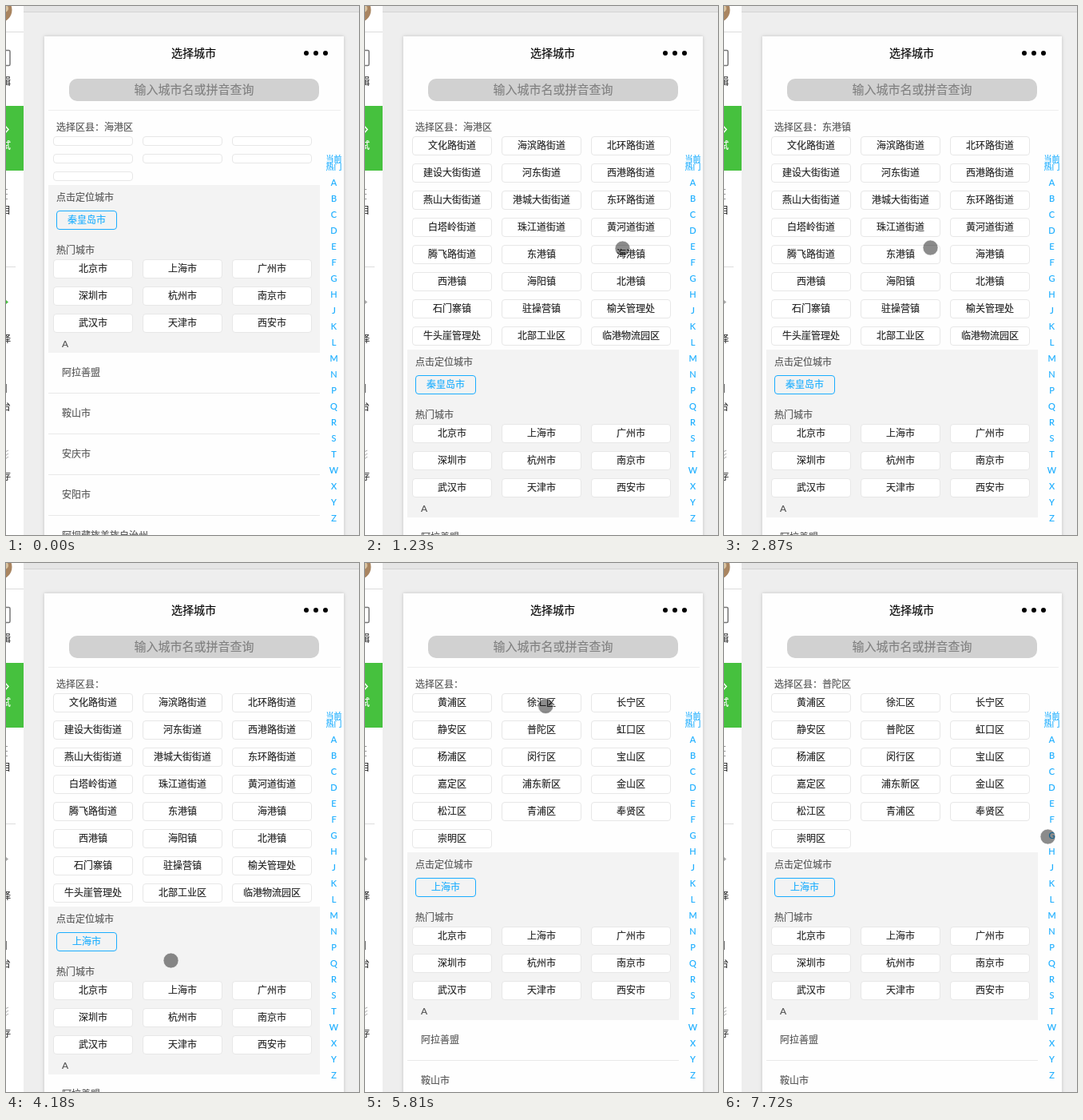
Write an HTML page that moves like this. It is 442 by 662 pixels and loops after 8000 ms.

```html
<!DOCTYPE html>
<html lang="zh-CN">
<head>
<meta charset="utf-8">
<title>选择城市</title>
<style>
  html, body { margin: 0; width: 100%; height: 100%; overflow: hidden; background: #eee; }
  svg { display: block; width: 442px; height: 662px; }
  text { font-family: "Noto Sans CJK SC", "Noto Sans CJK", sans-serif; }
  .latin { font-family: Lato, "Noto Sans", sans-serif; }
  .mid { text-anchor: middle; }
  .phone { filter: drop-shadow(0 0 2px rgba(0, 0, 0, .18)); }
</style>
</head>
<body>
<svg viewBox="0 0 442 662">
  <g id="back"></g>
  <g id="page"></g>
  <g id="side"></g>
  <circle id="cursor" r="9.5" fill="#000" fill-opacity=".45" stroke="#fff" stroke-opacity=".6"/>
</svg>
<script>
const LOOP = 8000, START = 30, TICK = 147.8;
const BLUE = '#1aadff', GREEN = '#46c13e', GREY = '#555';
const $ = id => document.getElementById(id);

const towns = ('文化路街道 海滨路街道 北环路街道 建设大街街道 河东街道 西港路街道 ' +
  '燕山大街街道 港城大街街道 东环路街道 白塔岭街道 珠江道街道 黄河道街道 ' +
  '腾飞路街道 东港镇 海港镇 西港镇 海阳镇 北港镇 石门寨镇 驻操营镇 榆关管理处 ' +
  '牛头崖管理处 北部工业区 临港物流园区').split(' ');
const districts = ('黄浦区 徐汇区 长宁区 静安区 普陀区 虹口区 杨浦区 闵行区 宝山区 ' +
  '嘉定区 浦东新区 金山区 松江区 青浦区 奉贤区 崇明区').split(' ');
const hot = '北京市 上海市 广州市 深圳市 杭州市 南京市 武汉市 天津市 西安市'.split(' ');
const cities = '阿拉善盟 鞍山市 安庆市 安阳市 阿坝藏族羌族自治州'.split(' ');
const blank = Array(7).fill('');

// first tick, buttons, chosen district, located city
const scenes = [
  [0, blank, '海港区', '秦皇岛市'],
  [1, towns, '海港区', '秦皇岛市'],
  [16, towns, '东港镇', '秦皇岛市'],
  [28, towns, '', '上海市'],
  [29, districts, '', '上海市'],
  [43, districts, '徐汇区', '上海市'],
  [47, districts, '普陀区', '上海市']
];

// pointer stops: tick, x, y
const stops = [
  [3, -20, 485], [8, 322, 303], [11, 333, 316], [14, 245, 312], [19, 258, 302],
  [21, 377, 385], [23, 197, 488], [26, 217, 535], [28, 206, 497], [32, 208, 238],
  [35, 222, 180], [41, 227, 178], [45, 242, 205], [50, 425, 351], [52, 405, 342]
];

const rect = (x, y, w, h, fill, more = '') =>
  `<rect x="${x}" y="${y}" width="${w}" height="${h}" fill="${fill}" ${more}/>`;
const circle = (x, y, r, fill) => `<circle cx="${x}" cy="${y}" r="${r}" fill="${fill}"/>`;
const path = (d, stroke, width = 1) =>
  `<path d="${d}" fill="none" stroke="${stroke}" stroke-width="${width}"/>`;

// text centred vertically on y, slightly thickened
const text = (s, x, y, fill = GREY, size = 12, cls = '') =>
  `<text x="${x}" y="${y + size * .37}" fill="${fill}" stroke="${fill}" stroke-width=".15"` +
  ` font-size="${size}" class="${cls}">${s}</text>`;

const button = (x, y, w, h, label, line, ink, fill) =>
  rect(x + .5, y + .5, w - 1, h - 1, fill, `rx="3.5" stroke="${line}"`) +
  text(label, x + w / 2, y + h / 2, ink, 12, 'mid');

const grid = (names, y, h = 24) => names.map((name, i) =>
  button(59 + i % 3 * 112, y + Math.floor(i / 3) * (h + 10), 100, h, name, '#e7e7e7', '#222', '#fff')
).join('');

function drawBack() {
  $('back').innerHTML =
    rect(0, 0, 442, 662, '#eee') + rect(22, 0, 420, 7, '#e5e5e5') + rect(22, 7, 420, 1, '#d4d4d4') +
    rect(48, 38, 375, 640, '#fefefe', 'class="phone"') +
    text('选择城市', 235, 59, '#000', 14, 'mid') +
    [376, 388, 400].map(x => circle(x, 59, 3, '#000')).join('') +
    rect(79, 91, 313, 28, '#d1d1d1', 'rx="10"') +
    text('输入城市名或拼音查询', 235.5, 104.5, '#808080', 15, 'mid') +
    rect(53, 130, 366, 1, '#eee') +
    text('当前', 410.5, 191, BLUE, 10, 'mid') + text('热门', 410.5, 201, BLUE, 10, 'mid') +
    [...'ABCDEFGHJKLMNPQRSTWXYZ'].map((c, i) =>
      text(c, 410.5, 221 + i * 20, BLUE, 11, 'mid latin')).join('');
}

function drawSide() {
  const word = (s, y, ink = '#333') => text(s, -6, y, ink);
  $('side').innerHTML =
    rect(0, 0, 22, 662, '#fff') +
    circle(-8, 5, 15.5, '#a98560') + circle(-2, 3, 5, '#d9c3a0') +
    rect(0, 32, 22, 1, '#ddd') +
    path('M-4 55.5H3.5Q5 55.5 5 57V73Q5 74.5 3.5 74.5H-4', '#777', 1.5) +
    word('辑', 95) +
    rect(0, 125, 22, 81, GREEN) +
    path('M-1 150L3 154.5L-1 159', '#fff', 1.5) +
    word('试', 175, '#fff') +
    path('M0 229.5H2M0 235.5H2M0 241.5H2', '#999') +
    word('目', 256) +
    rect(0, 326, 12, 1, '#ddd') +
    '<path id="arrow" d="M0 368L3 370.5L0 373Z"/>' +
    word('择', 417) +
    path('M.5 473V484', '#777') +
    word('台', 502) +
    path('M-1 558L3 556M-1 563L3 560M-1 567L3 564', '#aaa') +
    word('存', 589);
}

function drawPage([, names, chosen, city]) {
  const h = names === blank ? 12 : 24;
  const top = 158 + Math.ceil(names.length / 3) * (h + 10);
  $('page').innerHTML =
    text('选择区县：' + chosen, 63, 152) +
    grid(names, 163, h) +
    rect(53, top, 340, 210, '#f3f3f3') +
    text('点击定位城市', 63, top + 16) +
    button(63, top + 32, 76, 24, city, BLUE, BLUE, 'none') +
    text('热门城市', 63, top + 82) +
    grid(hot, top + 93) +
    text('A', 70, top + 199, GREY, 12, 'latin') +
    cities.map((name, i) =>
      text(name, 70, top + 235 + i * 51) +
      rect(53, top + 260 + i * 51, 340, 1, '#e9e9e9')).join('');
}

// eased position between the two stops around a tick
function pointer(tick) {
  const i = stops.findIndex(s => s[0] > tick);
  if (i < 0) return stops.at(-1).slice(1);
  const [t0, x0, y0] = stops[Math.max(i - 1, 0)], [t1, x1, y1] = stops[i];
  const p = Math.max(0, (tick - t0) / (t1 - t0 || 1));
  const e = i ? p * p * (3 - 2 * p) : 0;
  return [x0 + (x1 - x0) * e, y0 + (y1 - y0) * e];
}

let shown;

function frame() {
  const t = performance.now() % LOOP;
  const tick = Math.max(0, Math.floor((t - START) / TICK));
  const scene = scenes.findLast(s => s[0] <= tick);
  if (scene !== shown) drawPage(shown = scene);
  const [x, y] = pointer(tick);
  $('cursor').setAttribute('cx', x + .5);
  $('cursor').setAttribute('cy', y + .5);
  $('arrow').setAttribute('fill', tick < 3 ? GREEN : '#aaa');
  requestAnimationFrame(frame);
}

drawBack();
drawSide();
frame();
</script>
</body>
</html>
```
